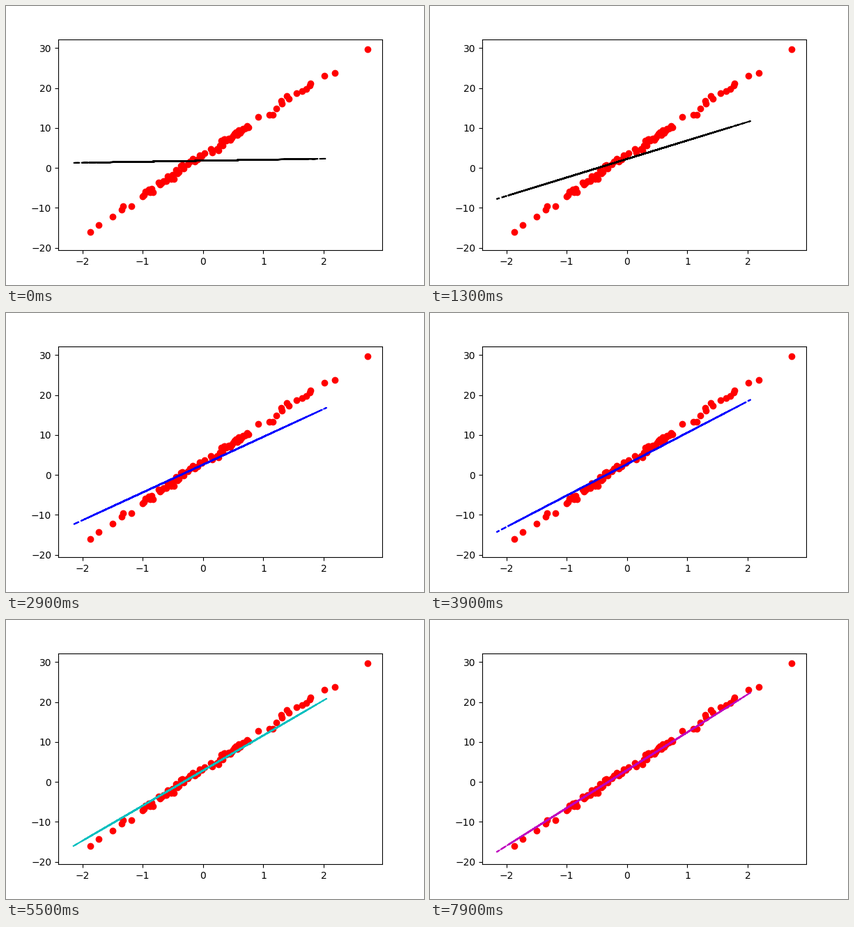
A matplotlib script that plays this animation: 600 px wide and 400 px high, repeating every 8000 ms.

```python
import numpy as np
import matplotlib.pyplot as plt
from matplotlib.animation import FuncAnimation

FRAMES = 80
COLORS = "kbcm"  # one per 20 epochs

rng = np.random.default_rng(4)

# Unsorted inputs: the dashes overlap and only leave gaps near the ends
x = rng.normal(size=100)
x = np.interp(x, (x.min(), x.max()), (-2.157, 2.045))

# Dense middle of the samples: start, end and size of each run
runs = [(-1, -.83, 9), (-.74, -.32, 17), (-.25, .02, 8),
        (.13, .15, 2), (.23, .75, 24)]
mid_x = np.concatenate([np.linspace(*run) for run in runs])
mid_y = 10 * mid_x + 3 + rng.normal(0, .6, mid_x.size).clip(-1.2, 1.2)

# Sparse outer samples
tails = np.array([
    (-1.87, -16), (-1.73, -14.3), (-1.5, -12.2), (-1.35, -10.4),
    (-1.325, -9.6), (-1.19, -9.6), (.91, 12.7), (1.1, 13.3),
    (1.16, 13.3), (1.215, 14.9), (1.295, 16.8), (1.31, 16.1),
    (1.39, 18), (1.42, 17.3), (1.55, 18.7), (1.645, 19.25),
    (1.71, 19.75), (1.77, 20.6), (1.78, 21.15), (2.01, 23.1),
    (2.185, 23.8), (2.73, 29.7),
])


def model(epoch):
    """Weight and bias while gradient descent approaches y = 10x + 3."""
    w = 10 - 8.5 * np.exp(-.0355 * epoch) - 1.25 * np.exp(-.4 * epoch)
    b = 3.03 - 1.23 * np.exp(-.034 * epoch)
    return w, b


fig, ax = plt.subplots(figsize=(6, 4), dpi=100)
fig.subplots_adjust(left=.125, right=.9, bottom=.125, top=.88)
ax.scatter(mid_x, mid_y, color="red")
ax.scatter(*tails.T, color="red")
line, = ax.plot([], [], "--", lw=1.5)
ax.set_xlim(-2.399, 2.969)
ax.set_ylim(-20.575, 32.145)


def update(epoch):
    w, b = model(epoch)
    line.set_data(x, w * x + b)
    line.set_color(COLORS[epoch // 20])
    return line,


anim = FuncAnimation(fig, update, frames=FRAMES, interval=100, repeat=True)
plt.show()
```
